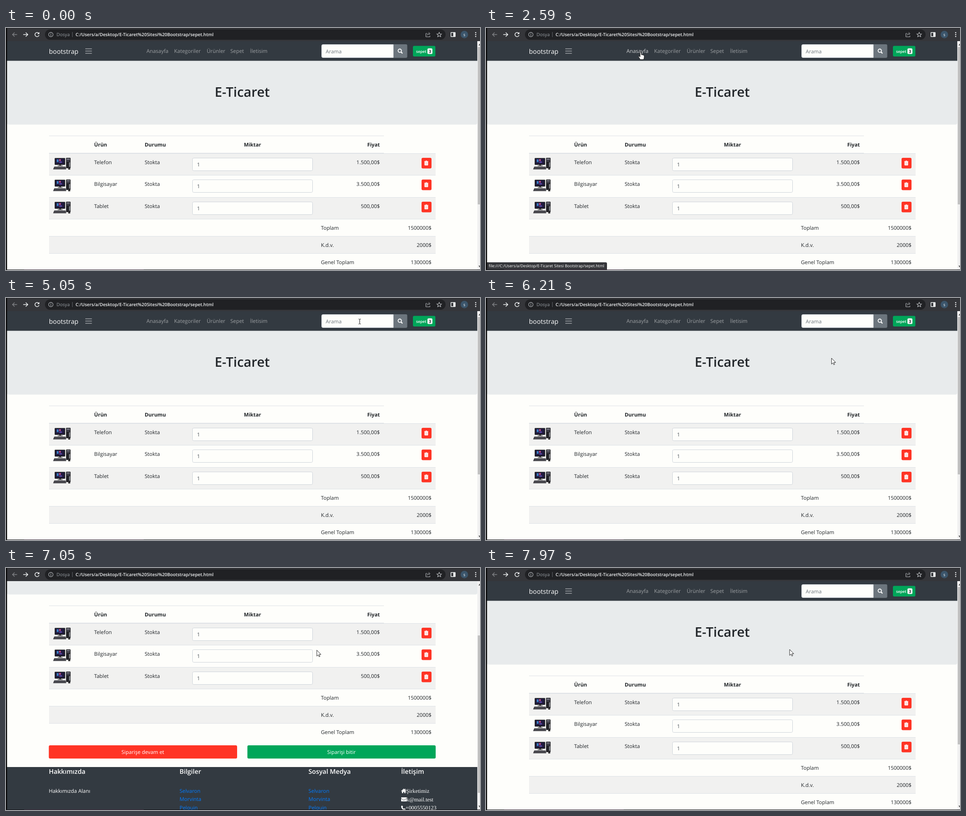
An HTML page for the animation above (8000 ms loop, 1046 by 535 pixels).

```html
<!DOCTYPE html>
<html lang="tr">
<head>
<meta charset="utf-8">
<title>E-Ticaret</title>
<style>
  html, body { margin: 0; width: 100%; height: 100%; overflow: hidden; background: #fefefb; }
  svg { display: block; width: 1046px; height: 535px; cursor: default; }
  text { font: 11.45px "Open Sans", "Noto Sans", sans-serif; fill: #212529; text-rendering: geometricPrecision; white-space: pre; }
  .serif { font: 12.3px "Liberation Serif", serif; }
  .nav { fill: #9da0a3; }
  .nav.on { fill: #d0d2d4; }
  .find.on { fill: #5a6268; }
  .cart.on { fill: #008a4b; }
</style>
</head>
<body>
<svg id="stage" viewBox="0 0 1046 535" xmlns="http://www.w3.org/2000/svg"></svg>
<script>
const rect = (x, y, w, h, fill, r = 0, more = '') =>
  `<rect x="${x}" y="${y}" width="${w}" height="${h}" rx="${r}" fill="${fill}" ${more}/>`;
const path = (d, fill, more = '') => `<path d="${d}" fill="${fill}" ${more}/>`;
const line = (d, color, w = 1) => path(d, 'none', `stroke="${color}" stroke-width="${w}"`);
const circle = (x, y, r, fill, more = '') => `<circle cx="${x}" cy="${y}" r="${r}" fill="${fill}" ${more}/>`;
const text = (x, y, str, { size, fill, anchor = 'start', weight = 400, cls = '' } = {}) =>
  `<text x="${x}" y="${y}" text-anchor="${anchor}" class="${cls}" style="` +
  (size ? `font-size:${size}px;` : '') + (fill ? `fill:${fill};` : '') +
  (weight > 400 ? `font-weight:${weight};` : '') + `">${str}</text>`;
const group = (content, more = '') => `<g ${more}>${content}</g>`;

const PAPER = '#fefefb', DARK = '#333a41', RULE = '#dee2e6', RED = '#ff3425', GREEN = '#00a65a', WHITE = '#fff';
const BORDER = 'stroke="#ced4da"';

function computer(y) {
  return group(
    rect(3.5, 2.5, 23, 15, '#15151a', 1) + rect(5.5, 4, 19, 11.5, '#211c40') +
    rect(8, 5.5, 4, 6, '#3b7fc4') + rect(13, 5, 4, 4, '#b8467c') + rect(13.5, 10, 6, 3, '#5a45a0') +
    rect(13.5, 17, 4, 2.5, '#333') + rect(10, 19, 11, 1.3, '#444') +
    rect(28.5, 2, 10, 23, '#222226', 1) + rect(30, 4, 7, 2, '#99a') + rect(30, 8, 7, 1.5, '#667') +
    rect(35, 12, 2.5, 10, '#888c92') +
    path('M2.5 21.5H27.5L29 27.5H0Z', '#333338') + line('M3 23.4H27M2 25.4H28', '#74747a', .7) +
    `<ellipse cx="35.5" cy="26.5" rx="2.7" ry="1.5" fill="#222"/>`,
    `transform="translate(104 ${y + 8})"`);
}

function trash(y) {
  return rect(917, y, 22, 23.5, RED, 3) +
    path(`M923.5 ${y + 8.6}h8v7.2q0 1-1 1h-6q-1 0-1-1zM923 ${y + 7.2}h3v-.9h3v.9h3v1h-9z`, WHITE) +
    line(`M925.7 ${y + 10}v5.3M927.5 ${y + 10}v5.3M929.3 ${y + 10}v5.3`, '#ff9b92', .6);
}

function product(name, price, i) {
  const y = Math.floor(277 + 48.5 * i), base = y + 24;
  return rect(95, y, 853, 49, i % 2 ? PAPER : '#f1f1f0') + rect(95, y, 853, 1, RULE) +
    computer(y) + text(194.5, base, name) + text(306, base, 'Stokta') +
    rect(411.5, y + 10.5, 265, 28, PAPER, 3, BORDER) +
    text(421.5, y + 29, '1', { fill: '#495057' }) +
    text(825, base, price, { anchor: 'end' }) + trash(y + 10);
}

function total(name, sum, i) {
  const y = Math.round(422 + 37.8 * i);
  return rect(95, y, 853, 38, i % 2 ? '#f1f1f0' : PAPER) + rect(95, y, 853, 1, RULE) +
    text(695, y + 23.6, name) + text(939, y + 23.6, sum, { anchor: 'end' });
}

const links = [['Anasayfa', 310, 358], ['Kategoriler', 371, 430], ['Ürünler', 443, 483],
  ['Sepet', 495, 526], ['İletisim', 538.5, 577]];

const navbar = rect(2, 29, 1038, 44, DARK) +
  text(94.8, 56.7, 'bootstrap', { size: 14.25, fill: WHITE }) +
  line('M175 46h14.5M175 51h14.5M175 56h14.5', '#a0a3a6', 1.4) +
  links.map(([name, x]) => text(x, 55.3, name, { cls: 'nav hot' })).join('') +
  rect(696.5, 36.5, 165, 29, PAPER, 3, BORDER) + text(705.5, 55.5, 'Arama', { fill: '#6c757d' }) +
  path('M855 36h27.5q3 0 3 3v24q0 3-3 3h-27.5z', '#6c757d', 'class="find hot"') +
  circle(869, 50.2, 3.7, 'none', 'stroke="#fff" stroke-width="1.8"') +
  line('M871.6 52.9l3.3 3.3', WHITE, 2.2) +
  rect(898, 39.5, 49.5, 23.5, GREEN, 3, 'class="cart hot"') +
  text(905, 55, 'sepet', { size: 8.5, weight: 600, fill: WHITE }) +
  rect(930, 45, 11, 12.5, '#f8f9fa', 2.5) + text(935.5, 55, '3', { size: 9, weight: 700, anchor: 'middle' });

const banner = path('M2 72.6H1040V209.5q0 4-4 4H6q-4 0-4-4Z', '#e8ebec') +
  text(521.3, 152, 'E-Ticaret', { size: 29.4, weight: 600, anchor: 'middle' });

const head = (x, str, anchor) => text(x, 262, str, { size: 11.3, weight: 700, anchor });
const table = rect(95, 238, 739, 1, RULE) +
  head(194.5, 'Ürün') + head(306, 'Durumu') + head(544, 'Miktar', 'middle') + head(825, 'Fiyat', 'end') +
  [['Telefon', '1.500,00$'], ['Bilgisayar', '3.500,00$'], ['Tablet', '500,00$']]
    .map(([name, price], i) => product(name, price, i)).join('') +
  rect(95, 276, 739, 1.5, RULE) +
  [['Toplam', '1500000$'], ['K.d.v.', '2000$'], ['Genel Toplam', '130000$']]
    .map(([name, sum], i) => total(name, sum, i)).join('');

const wide = (x, fill, str) => rect(x, 547, 415.5, 29.3, fill, 3) +
  text(x + 207.5, 566.3, str, { fill: WHITE, anchor: 'middle' });

const title = (x, str) => text(x, 610, str, { size: 14.25, weight: 600, fill: WHITE });
const rowY = i => 652 + 18.4 * i;
const social = x => ['Selvaron', 'Morvinta', 'Pelquin', 'Dorvexin']
  .map((name, i) => text(x, rowY(i), name, { fill: '#007bff' })).join('');
const contact = [[883, 'Şirketimiz'], [883.5, 'k@mail.test'], [881.5, '+0005550123'], [883, '+0005550178']]
  .map(([x, str], i) => text(x, rowY(i) + .3, str, { cls: 'serif', fill: WHITE })).join('');
const icons = path('M872 648l5.7-5.3 2.3 2.1v-1.6h1.6v3.1l1.8 1.7-1 1-4.7-4.3-4.7 4.3zM873.7 648.7l4-3.6 4 3.6v4h-2.8v-3h-2.4v3h-2.8z', WHITE) +
  rect(872, 662, 12, 9, WHITE, 1) + line('M872 664.5l6 4 6-4', DARK, .9) +
  path('M874 680l2.2 2.8-1.2 1.4q1 2.4 3 3.4l1.3-1.3 2.5 1.7q-.4 2.6-2.6 2.4-6-1.2-7.2-7.6-.1-2 2-2.8z', WHITE) +
  path('M874 698h6l2 2v2.5h1.3v5H882v1.5h-8v-1.5h-1.6v-5h1.6z', WHITE) +
  line('M875.3 703h5.4M875.3 706.8h5.4', DARK, 1.2);

const footer = rect(2, 595, 1038, 130, DARK) +
  title(94.5, 'Hakkımızda') + title(383, 'Bilgiler') + title(667.5, 'Sosyal Medya') + title(872, 'İletişim') +
  text(94.5, 652, 'Hakkımızda Alanı', { fill: WHITE }) + social(383) + social(667.5) + contact + icons;

const toolbar = rect(0, 0, 1046, 29, '#35363a') + rect(0, 0, 1046, 1, '#222327') +
  rect(86, 3, 884, 23, '#202124', 11.5) +
  line('M24.5 14.5H14.5M19 10l-4.7 4.5 4.7 4.5', '#85868a', 1.3) +
  line('M38 14.5H48M43.5 10l4.7 4.5-4.7 4.5', '#f1f3f4', 1.4) +
  line('M72.4 12A4.6 4.6 0 1 0 72.9 16', '#f1f3f4', 1.5) + path('M73.6 9v4.6h-4.6z', '#f1f3f4') +
  circle(99, 14.5, 4.9, 'none', 'stroke="#b4b7bb" stroke-width="1.1"') +
  line('M99 13.7v3.6M99 11.4v1.3', '#b4b7bb', 1.2) +
  text(111.5, 18.2, 'Dosya', { size: 10.15, fill: '#9aa0a6' }) + rect(146, 9, 1, 11, '#5f6368') +
  text(153.5, 18.2, 'C:/Users/a/Desktop/E-Ticaret%20Sitesi%20Bootstrap/sepet.html', { size: 9.88, weight: 600, fill: '#f1f3f4' }) +
  line('M929.5 12h-3v7.5h9v-2.5M929 16.5q.5-4 5-4M932.5 9.7l3.4 2.8-3.4 2.8', '#b4b7bb') +
  path('M956 9.6l1.5 3.4 3.7.3-2.8 2.4.9 3.6-3.3-2-3.3 2 .9-3.6-2.8-2.4 3.7-.3z', 'none', 'stroke="#c4c7ca" stroke-width="1.1"') +
  rect(981.8, 10, 9.6, 9, 'none', .5, 'stroke="#f1f3f4" stroke-width="1.4"') + rect(987, 10, 4.5, 9, '#f1f3f4') +
  circle(1011.5, 14.5, 8.3, '#3b556b') + text(1011.5, 17.6, 's', { size: 9, fill: WHITE, anchor: 'middle' }) +
  [10.3, 14.5, 18.7].map(y => circle(1036.5, y, 1.3, '#f1f3f4')).join('');

const scrollbar = rect(1040, 29, 6, 506, '#f1f1f1') +
  path('M1042.5 38.5l3.5-4v4z', '#505050') + path('M1042.5 525.5l3.5 4v-4z', '#505050') +
  rect(1041, 42, 5, 348, '#c1c1c1', 0, 'id="thumb"');

const edges = rect(0, 0, 2.3, 535, '#050505') + rect(0, 534, 1046, 1, '#101014') + rect(40, 534, 264, 1, '#3a2838');

const statusBar = group(path('M2 518H264q3 0 3 3V534H2Z', '#35363a') +
  text(6, 529.3, 'file:///C:/Users/a/Desktop/E-Ticaret Sitesi Bootstrap/sepet.html', { size: 8.78, fill: WHITE }), 'id="status"');

const cursors = group(
  path('M0 0V13.2L3.1 10.4 5 14.7 7 13.8 5.1 9.6H9.2Z', WHITE, 'stroke="#111" stroke-width=".9" id="arrow"') +
  path('M-1.3 1.1Q0-.7 1.3 1.1V6.3Q2.8 5.5 3.6 6.8 5 6.1 5.8 7.4 7.6 7 7.7 8.8V12.4Q7.4 14.5 6.3 17H-.9Q-2.2 14.4-4.6 11.2-5.2 9.4-3.4 9.5L-1.3 11Z', WHITE, 'stroke="#111" stroke-width=".9" id="hand"') +
  path('M-2.5-5.5Q0-5.5 0-4.5 0-5.5 2.5-5.5M0-4.5V4.5M-2.5 5.5Q0 5.5 0 4.5 0 5.5 2.5 5.5', 'none', 'stroke="#111" id="beam"'),
  'id="cursor"');

const stage = document.getElementById('stage');
stage.innerHTML = rect(0, 0, 1046, 535, PAPER) +
  group(navbar + banner + table + wide(94.5, RED, 'Siparişe devam et') + wide(532.7, GREEN, 'Siparişi bitir') + footer, 'id="page"') +
  scrollbar + toolbar + statusBar + edges + cursors;

const $ = id => document.getElementById(id);
const hot = [...document.querySelectorAll('.hot')];
const zones = [...links.map(([, a, b]) => [a, b]), [855, 885], [897, 948]];

// Key rows: time followed by values, joined linearly
const moves = [[440, 998, 518], [700, 800, 350], [1000, 360, 110], [1210, 222, 48], [1440, 178, 46],
  [1730, 264, 54], [2050, 324, 53], [2240, 327, 52], [2680, 345, 53], [2850, 362, 53], [3200, 422, 53],
  [3410, 443, 51], [3670, 497, 52], [4450, 600, 54], [4530, 622, 54], [5050, 780, 52],
  [5270, 898, 54], [5400, 916, 53], [5680, 914, 54], [5820, 905, 58], [6300, 730, 150],
  [6630, 692, 177], [7180, 684, 183], [7570, 682, 185], [7970, 670, 180]];
const scrolls = [[6500, 0], [6630, 73], [6680, 77], [6800, 77], [6930, 153], [7040, 153], [7180, 181],
  [7600, 181], [7720, 104], [7800, 104], [7940, 0]];
const fades = [[2240, 0], [2360, 1], [3310, 1], [3460, 0]];

function at(keys, t) {
  const i = keys.findIndex(k => k[0] > t);
  if (i < 0) return keys[keys.length - 1].slice(1);
  if (i === 0) return keys[0].slice(1);
  const a = keys[i - 1], b = keys[i], p = (t - a[0]) / (b[0] - a[0]);
  return a.slice(1).map((v, j) => v + (b[j + 1] - v) * p);
}

const show = (id, on) => $(id).setAttribute('visibility', on ? 'visible' : 'hidden');

function draw() {
  const t = performance.now() % 8000;
  const [x, y] = at(moves, t), [scroll] = at(scrolls, t), [fade] = at(fades, t);
  const visible = t >= 440, inNav = visible && scroll === 0 && y > 36 && y < 66;
  const over = inNav ? zones.findIndex(([a, b]) => x >= a - 1 && x <= b) : -1;
  const typing = inNav && x > 696 && x < 854;
  const hand = over >= 0 || (inNav && x > 174 && x < 190);

  hot.forEach((el, i) => el.classList.toggle('on', i === over));
  $('page').setAttribute('transform', `translate(0 ${-Math.round(scroll)})`);
  $('thumb').setAttribute('y', 42 + scroll * .69);
  $('status').setAttribute('opacity', fade);
  $('cursor').setAttribute('transform', `translate(${x} ${y})`);
  show('hand', hand);
  show('beam', typing);
  show('arrow', visible && !hand && !typing);
  requestAnimationFrame(draw);
}
draw();
</script>
</body>
</html>
```
